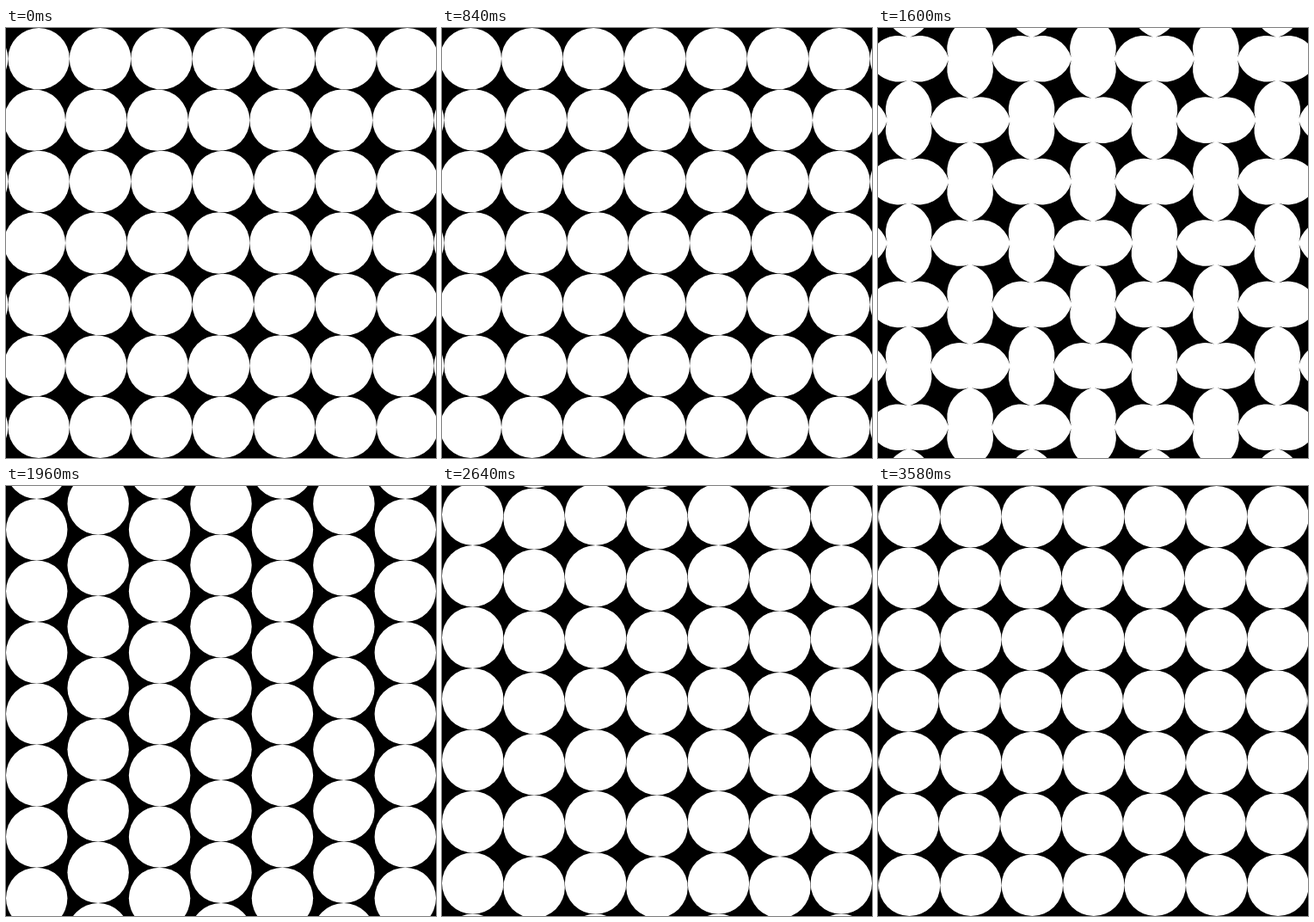
Recreate the animation shown at these times as an HTML page with a canvas. Size 500 by 500 pixels, loop 3600 ms.

```html
<!DOCTYPE html>
<html>
<head>
<meta charset="utf-8">
<style>
html, body { margin: 0; height: 100%; overflow: hidden; background: #000; }
canvas { display: block; }
</style>
</head>
<body>
<canvas id="stage" width="500" height="500"></canvas>
<script>
const ctx = document.getElementById('stage').getContext('2d');
const COUNT = 7, CELL = 500 / COUNT, R = CELL / 2;
const STEP_MS = 20, STEPS = 180, PHASE_STEPS = 45, LEAD = 1.5;

const sign = n => n % 2 ? -1 : 1;

function fillStage(color) {
  ctx.fillStyle = color;
  ctx.fillRect(0, 0, 500, 500);
}

// Lines of touching discs; neighbouring lines slide in opposite directions.
function drawDiscs(progress, vertical) {
  fillStage('#000');
  ctx.fillStyle = '#fff';
  for (let line = 0; line < COUNT; line++) {
    const across = line * CELL + R;
    for (let i = -1; i <= COUNT; i++) {
      const along = (i + sign(line) * progress) * CELL + R;
      ctx.beginPath();
      ctx.arc(vertical ? across : along, vertical ? along : across, R, 0, 2 * Math.PI);
      ctx.fill();
    }
  }
}

// The gap between four discs, as a four-pointed star.
function drawStar(x, y, angle) {
  ctx.beginPath();
  for (let k = 0; k < 4; k++) {
    const a = angle + k * Math.PI / 2;
    const corner = a - Math.PI / 4;
    ctx.arc(x + CELL * Math.SQRT1_2 * Math.cos(corner),
            y + CELL * Math.SQRT1_2 * Math.sin(corner),
            R, a + Math.PI, a + Math.PI / 2, true);
  }
  ctx.fill();
}

// Stars make a quarter turn, alternating like a chessboard.
function drawStars(progress, direction) {
  fillStage('#fff');
  ctx.fillStyle = '#000';
  for (let row = 0; row <= COUNT; row++) {
    for (let col = 0; col <= COUNT; col++) {
      drawStar(col * CELL, row * CELL, direction * sign(row + col) * progress * Math.PI / 2);
    }
  }
}

function render(now) {
  const step = (Math.floor(now / STEP_MS) + LEAD) % STEPS;
  const phase = Math.floor(step / PHASE_STEPS);
  const progress = step / PHASE_STEPS - phase;
  if (phase % 2) drawStars(progress, phase === 1 ? -1 : 1);
  else drawDiscs(progress, phase === 2);
}

let start;
function tick(now) {
  start ??= now;
  render(now - start);
  requestAnimationFrame(tick);
}
render(0);
requestAnimationFrame(tick);
</script>
</body>
</html>
```
